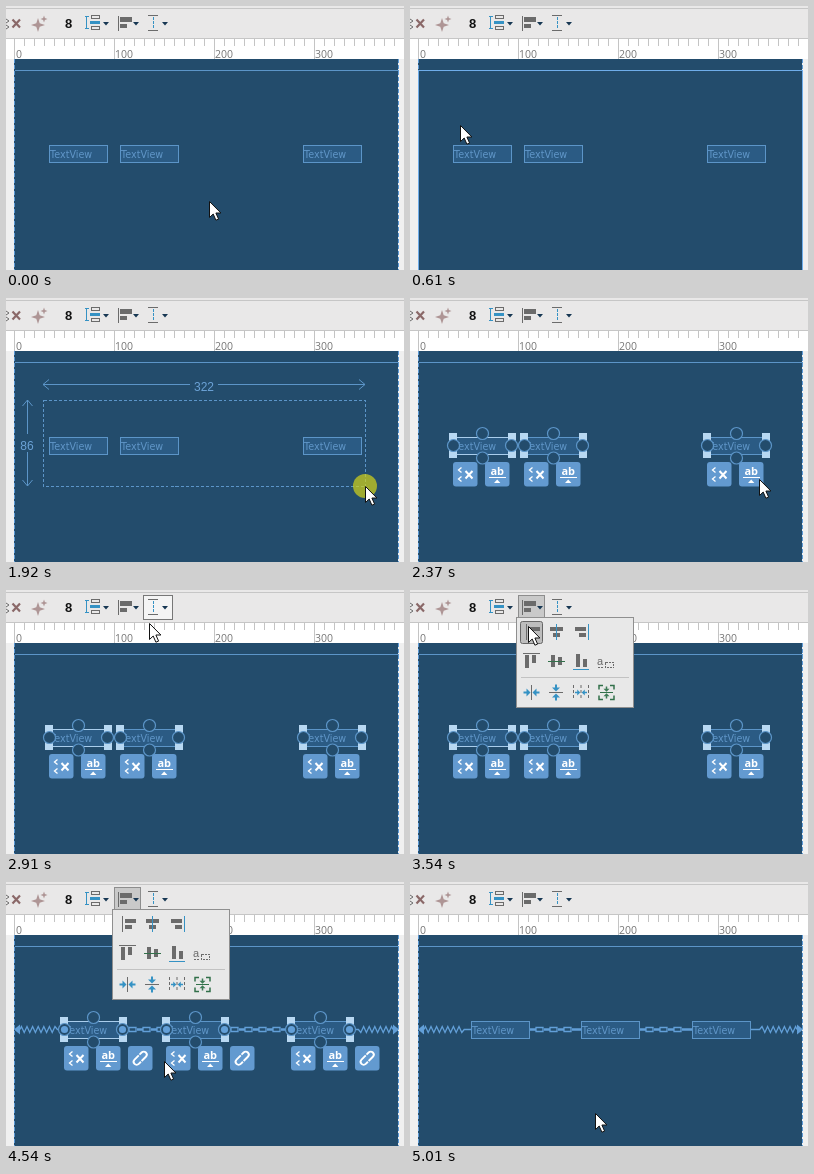
Recreate the animation shown at these times as an HTML page. Size 398x264 px, loop 6.64 s.

```html
<!DOCTYPE html>
<html lang="en">
<head>
<meta charset="utf-8">
<title>Layout editor: creating a chain</title>
<style>
  html, body { margin: 0; width: 100%; height: 100%; overflow: hidden; background: #f0f0f0; }
  svg { display: block; width: 398px; height: 264px; }
  text { font-family: "Liberation Sans", Arial, sans-serif; }
  .crisp { shape-rendering: crispEdges; }
  .ruler text { font: 10.5px "Open Sans", sans-serif; fill: #777; }
  .line { fill: none; stroke: #5c95c8; }
  .label { font-size: 12px; fill: #6ba2d6; text-anchor: middle; }
  .view text { font: 9.6px "DejaVu Sans", sans-serif; fill: #6096c8; }
  .view .ab { font: bold 11px "Open Sans", sans-serif; fill: #fff; text-anchor: middle; }
  .ring { fill: #234c6c; stroke: #5c95c8; stroke-width: 1.2; }
  .g { fill: #6b6b6b; } .b { fill: #3592c4; } .n { fill: #3d7a55; }
  .gs { fill: none; stroke: #6b6b6b; } .bs { fill: none; stroke: #3592c4; } .ns { fill: none; stroke: #32704a; }
</style>
</head>
<body>
<svg viewBox="0 0 398 264">
  <defs>
    <path id="drop" d="M0 0h6l-3 3.5z" fill="#173753"/>
    <path id="hArrows" d="M-8-1h3v-3l4 4-4 4v-3h-3zM8-1h-3v-3l-4 4 4 4v-3h3z"/>
  </defs>

  <!-- toolbar -->
  <rect width="398" height="33" fill="#e9e8e8"/>
  <path class="crisp" d="M0 2.5h398M0 32.5h398" stroke="#c6c6c6"/>
  <g id="hover" class="crisp"><rect x="137.5" y="5.5" width="29" height="24" fill="#f4f4f4" stroke="#777"/></g>
  <g id="hover2" class="crisp"><rect x="108.5" y="5.5" width="26" height="24" fill="#c9c9c9" stroke="#8d8d8d"/></g>
  <path d="M0 13l3 2-3 2M0 19l3 2-3 2" class="gs"/>
  <path d="M6.500 13.500l7.500 8M14 13.500l-7.500 8" stroke="#8a6868" stroke-width="2.200"/>
  <path d="M32 12l1.700 5.300 5.300 1.700-5.300 1.700-1.700 5.300-1.700-5.300-5.300-1.700 5.300-1.700zM38 9.500l.9 2.600 2.600.9-2.600.9-.9 2.600-.9-2.600-2.600-.9 2.600-.9z" fill="#ae9595"/>
  <text x="59" y="22" font-size="13" font-weight="bold" fill="#111">8</text>
  <g class="crisp">
    <path d="M85.500 9.500h8v3h-8zM85.500 20.500h8v3h-8z" class="gs"/>
    <path d="M84 15h10v3h-10z" class="b"/>
    <path d="M79 10.500h4M79 22.500h4M80.500 11v12" class="bs"/>
    <path d="M112 10h1v15h-1zM114 11h12v5h-12zM114 18h7v4h-7z" class="g"/>
    <path d="M142 9.500h10M142 24.500h10" class="gs"/>
    <path d="M147.500 11v12" class="bs" stroke-dasharray="3 1"/>
  </g>
  <use href="#drop" x="97" y="16"/><use href="#drop" x="127" y="16"/><use href="#drop" x="156" y="16"/>

  <!-- ruler and blueprint -->
  <g class="ruler">
    <rect y="33" width="398" height="20" fill="#fff"/>
    <g class="crisp" stroke="#c4c4c4">
      <path d="M8 36.500h385" stroke-width="7" stroke-dasharray="1 9"/>
      <path d="M8 43h385" stroke-width="20" stroke-dasharray="1 99"/>
    </g>
    <text x="10" y="52">0</text><text x="109" y="52">100</text><text x="209" y="52">200</text><text x="309" y="52">300</text>
  </g>
  <rect x="8" y="53" width="384" height="211" fill="#234c6c"/>
  <g class="crisp">
    <path d="M8.500 53v211M392.500 53v211" stroke="#5d9ad6" stroke-dasharray="4 2"/>
    <path id="frame" d="M8.500 264v-199.500h384v199.500" fill="none"/>
  </g>

  <path id="chain" class="line" style="stroke:#629fd8" stroke-width="1.300"/>
  <path id="heads" d="M8 147.500l6-5v10zM393 147.500l-6-5v10z" fill="#629fd8"/>
  <g id="views"></g>

  <g id="drag">
    <path id="box" class="line crisp" stroke-dasharray="3 2"/>
    <path id="dims" class="line"/>
    <text id="wide" class="label" y="93"></text>
    <text id="high" class="label" x="21"></text>
  </g>

  <!-- alignment popup -->
  <g id="popup">
    <rect x="106.500" y="27.500" width="117" height="90" fill="#e8e8e8" stroke="#8f8f8f" class="crisp"/>
    <rect id="cell" x="110.500" width="22" height="22" rx="2" fill="#bdbdbd" stroke="#666"/>
    <g class="crisp">
      <path d="M111 87.500h108" stroke="#c2c2c2"/>
      <path class="g" d="M119 37h11v4h-11zM119 43h7v4h-7zM140 37h13v4h-13zM143 43h7v4h-7zM165 37h11v4h-11zM169 43h7v4h-7zM115 65h4v13h-4zM122 65h4v8h-4zM141 65h4v12h-4zM148 67h4v8h-4zM166 64h4v13h-4zM173 69h4v8h-4z"/>
      <path class="gs" d="M116.500 34v16M113 63.500h17"/>
      <path class="bs" d="M146.500 34v16M178.500 34v16M163 79.500h16" stroke-width="1.500"/>
      <path class="ns" d="M138 71.500h17"/>
      <path class="gs" d="M188 77.500h6M195.500 72.500h8v5h-8z" stroke-dasharray="2 1"/>
    </g>
    <text x="187" y="75" font-size="11" class="g">a</text>
    <path class="gs" d="M121.500 95v15M139 102.500h14"/>
    <use href="#hArrows" class="b" transform="translate(121.500 102.500)"/>
    <use href="#hArrows" class="b" transform="translate(146 102.500) rotate(90)"/>
    <path class="gs" d="M163.500 95v15M178.500 95v15M171 95v15" stroke-dasharray="3 2"/>
    <use href="#hArrows" class="b" transform="translate(171 102.500) scale(.75)"/>
    <path class="ns" stroke-width="1.500" d="M193 95.500h-4v4M200 95.500h4v4M193 109.500h-4v-4M200 109.500h4v-4"/>
    <path class="ns" d="M190 102.500h13"/>
    <use href="#hArrows" class="n" transform="translate(196.500 102.500) rotate(90) scale(.75)"/>
  </g>

  <g id="cursor">
    <circle id="press" r="12" fill="#d4d418" fill-opacity=".7"/>
    <path d="M.5.5v16l3.700-3.500 2.700 6.200 2.700-1.100-2.700-6.100h5z" fill="#fff" stroke="#111"/>
  </g>
</svg>
<script>
const LOOP = 6640;
// bursts of movement: first step, last step, number of steps
const BURSTS = [[150, 610, 7], [760, 1380, 9], [1450, 1920, 7], [2140, 2760, 9], [2840, 3060, 4],
  [3230, 3310, 2], [3460, 3840, 6], [4070, 4690, 9], [4770, 5010, 4]];

const linear = p => p;
const smooth = p => (1 - Math.cos(Math.PI * p)) / 2;
const speedUp = p => p ** 1.3;
const slowDown = p => 1 - (1 - p) ** 1.5;

// pointer path: step, x, y, easing towards that point
const PATH = [[0, 203, 195], [7, 50, 119, smooth], [9, 37, 102, smooth], [11, 37, 102, linear],
  [17, 238, 189, speedUp], [23, 359, 188, slowDown], [25, 359, 188, linear], [32, 147, 38, smooth],
  [34, 138, 28, linear], [36, 118, 16, linear], [38, 118, 16, linear], [44, 116, 95, smooth],
  [48, 116, 95, linear], [53, 180, 224, smooth], [54, 185, 231, linear]];
const START = [43, 114, 297], END = [61, 171, 282];
const X0 = 37, Y0 = 102;

const $ = id => document.getElementById(id);
const show = (el, on) => { el.style.display = on ? "" : "none"; };
const set = (id, name, value) => $(id).setAttribute(name, value);
const within = (s, a, b) => s >= a && s <= b;

function viewMarkup(first) {
  const square = (x, y) => `<rect x="${x - 4}" y="${y - 4}" width="8" height="8" fill="#b8d8f2"/>`;
  const ring = (x, y) => `<circle class="ring" cx="${x}" cy="${y}" r="6"/>`;
  const dot = x => `<circle cx="${x}" cy="147.500" r="3.600" fill="#629fd8"/>`;
  const button = (x, icon) => `<g transform="translate(${x} 164)"><rect width="24.500" height="24.500" rx="3" fill="#639ad0"/>${icon}</g>`;
  const clear = `<path d="M12.500 9l7 7.500M19.500 9l-7 7.500" stroke="#fff" stroke-width="2"/>
    <path d="M8.500 5.500l-3 2.500 3 2.500M8.500 14.500l-3 2.500 3 2.500" fill="none" stroke="#fff" stroke-width="1.300"/>`;
  const base = `<text class="ab" x="12.200" y="13">ab</text><path d="M4 15.500h17" stroke="#fff"/><path d="M9 21l3.200-3.500 3.200 3.500z" fill="#fff"/>`;
  const link = `<g transform="translate(12.200 12.200) rotate(-45)" fill="none" stroke="#fff" stroke-width="1.900">
    <path d="M1-3h-6a3 3 0 0 0 0 6h3M-1 3h6a3 3 0 0 0 0-6h-3"/></g>`;
  const edge = first ? "#a9cdec" : "#5c95c8";
  return `<rect class="crisp" x=".5" y="139.500" width="58" height="17" fill="#2b5b84" stroke="#5c95c8"/>
    <text x="1" y="152">TextView</text>
    <g class="sel"><rect class="crisp" x=".5" y="139.500" width="58" height="17" fill="none" stroke="${edge}"/>
      ${square(0, 139)}${square(59, 139)}${square(0, 156)}${square(59, 156)}
      ${ring(.5, 147.5)}${ring(58.5, 147.5)}${ring(29.5, 135.5)}${ring(29.5, 160)}
      <g class="tied">${dot(.5)}${dot(58.5)}</g>
      ${button(0, clear)}${button(32, base)}<g class="tied">${button(64, link)}</g></g>`;
}

const views = START.map((x, i) => {
  const g = document.createElementNS("http://www.w3.org/2000/svg", "g");
  g.setAttribute("class", "view");
  g.innerHTML = viewMarkup(i === 0);
  $("views").append(g);
  return g;
});

function stepAt(t) {
  let s = 0;
  for (const [a, b, n] of BURSTS) {
    if (t >= a) s += Math.min(n, 1 + Math.floor((t - a) * (n - 1) / (b - a) + 0.001));
  }
  return s;
}

function pointer(s) {
  const i = PATH.findIndex(p => p[0] >= s);
  if (i === 0) return PATH[0].slice(1, 3);
  if (i < 0) return PATH.at(-1).slice(1, 3);
  const [a, ax, ay] = PATH[i - 1], [b, bx, by, ease] = PATH[i];
  const p = ease((s - a) / (b - a));
  return [Math.round(ax + (bx - ax) * p), Math.round(ay + (by - ay) * p)];
}

// zigzag from the wall towards a view, ending in a straight lead
function spring(wall, x) {
  const dir = Math.sign(x - wall), n = Math.max(2, Math.floor((Math.abs(x - wall) - 13) / 2.8));
  let d = `M${wall + dir * 6} 147.5`;
  for (let i = 0; i < n; i++) d += `L${wall + dir * (7.4 + i * 2.8)} ${i % 2 ? 150.5 : 144.5}`;
  return d + `L${wall + dir * (7 + n * 2.8)} 147.5H${x}`;
}

function links(a, b) {
  let d = "", x = a;
  for (; x + 13 < b; x += 14) d += `M${x} 146.8h6M${x} 148.2h6M${x + 6} 145.5h7v4h-7z`;
  return d + `M${x} 146.8H${b}M${x} 148.2H${b}`;
}

function drawDrag(x, y) {
  const mx = Math.round((X0 + x) / 2), my = Math.round((Y0 + y) / 2);
  const gap = Math.min(14, (x - X0) / 2), vGap = Math.min(9, (y - Y0) / 2);
  set("box", "d", `M${X0 + .5} ${Y0 + .5}H${x + .5}V${y + .5}H${X0 + .5}z`);
  set("dims", "d", `M${X0} 86.500H${mx - gap}M${mx + gap} 86.500H${x}M${X0 + 6} 81.500l-6 5 6 5M${x - 6} 81.500l6 5-6 5
    M21.500 ${Y0}V${my - vGap}M21.500 ${my + vGap}V${y}M16.500 ${Y0 + 6}l5-6 5 6M16.500 ${y - 6}l5 6 5-6`);
  $("wide").textContent = x - X0;
  set("wide", "x", mx);
  $("high").textContent = y - Y0;
  set("high", "y", my + 7);
}

function draw(s) {
  const [x, y] = pointer(s);
  set("cursor", "transform", `translate(${x} ${y})`);
  show($("press"), within(s, 11, 23) || s === 37 || within(s, 45, 46) || within(s, 55, 56));
  set("frame", "stroke", within(s, 1, 10) ? "#6fadea" : "#5c95c8");
  set("frame", "stroke-dasharray", within(s, 1, 10) ? "none" : "0 200 384 200");

  const dragging = within(s, 12, 23);
  show($("drag"), dragging);
  if (dragging) drawDrag(x, y);

  const open = within(s, 38, 54);
  show($("hover"), within(s, 33, 34));
  show($("hover2"), within(s, 35, 54));
  show($("popup"), open);
  const row = y > 91 ? 91.5 : y > 59 ? 60.5 : 31.5;
  show($("cell"), open && within(y, 31, 114) && within(x, 110, 133));
  set("cell", "y", row);

  const tied = s >= 45;
  const p = smooth(Math.min(1, Math.max(0, (s - 46) / 7)));
  const xs = START.map((a, i) => Math.round(a + (END[i] - a) * p));
  views.forEach((v, i) => {
    v.setAttribute("transform", `translate(${xs[i]} 0)`);
    show(v.querySelector(".sel"), within(s, 24, 55));
    v.querySelectorAll(".tied").forEach(el => show(el, tied));
  });
  show($("chain"), tied);
  show($("heads"), tied);
  if (tied) set("chain", "d", spring(8, xs[0]) + links(xs[0] + 59, xs[1]) + links(xs[1] + 59, xs[2]) + spring(393, xs[2] + 59));
}

let last = -1;
const begin = performance.now();
function tick() {
  const s = stepAt((performance.now() - begin) % LOOP);
  if (s !== last) draw(last = s);
  requestAnimationFrame(tick);
}
tick();
</script>
</body>
</html>
```
